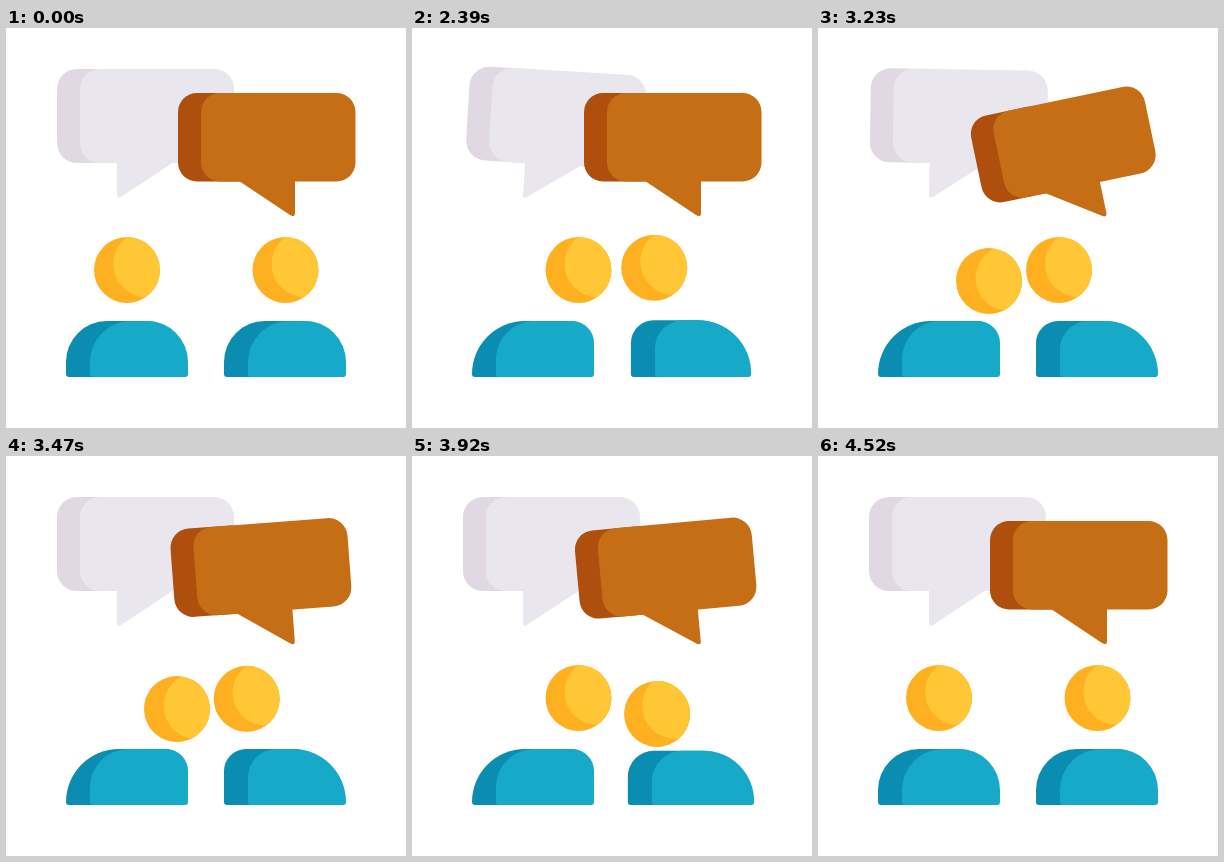
Write an HTML page that moves like this. It is 400 px wide and 400 px high and loops after 4550 ms.

```html
<!DOCTYPE html>
<html lang="en">
<head>
<meta charset="utf-8">
<title>Conversation</title>
<style>
  html, body { margin: 0; width: 100%; height: 100%; overflow: hidden; background: #fff; }
  svg { display: block; width: 100%; height: 100%; }
  .skin { fill: #ffb020; }
  .glow { fill: #ffc636; }
  .shade { fill: #0b8cb1; }
  .shirt { fill: #16a9c8; }
</style>
</head>
<body>
<svg viewBox="0 0 400 400">
  <defs>
    <clipPath id="face"><circle r="33"/></clipPath>
    <g id="head">
      <circle class="skin" r="33"/>
      <g clip-path="url(#face)"><circle class="glow" cx="19" cy="-6" r="33"/></g>
    </g>
  </defs>
  <g id="bubbleL" fill="#eae6ed">
    <rect x="51" y="41" width="80" height="94" rx="20" fill="#e0d9e3"/>
    <rect x="74" y="41" width="154" height="94" rx="20"/>
    <path d="M111 130V167Q111 171 115 169L168 134V130Z"/>
  </g>
  <g id="bubbleR" fill="#c66e16">
    <rect x="172" y="65" width="80" height="88.5" rx="19" fill="#ae4f0e"/>
    <rect x="195" y="65" width="154.5" height="88.5" rx="19"/>
    <path d="M233 150V153L284 187Q289 190 289 185V150Z"/>
  </g>
  <path id="shadeL" class="shade"/><path id="shirtL" class="shirt"/>
  <path id="shadeR" class="shade"/><path id="shirtR" class="shirt"/>
  <use id="headL" href="#head"/>
  <use id="headR" href="#head"/>
</svg>
<script>
const LOOP = 4550, REST = 2030, STEP = 30, MOVE = 380;

// Times in ms against degrees: a swing that dies away
const SWING = [[0, 0], [235, -22], [500, 15.3], [715, -9.3], [970, 3], [1400, 0]];
// Share of a move against pixels: squash, then a slight stretch
const SQUASH = [[0, 0], [.45, 3], [.87, -1], [1, 0]];

const people = [
  { id: 'L', left: 60, right: 182, from: 121, to: 166.5, side: 1,
    lean: 1990, back: 4012, nodIn: 2795, nodOut: 3640, nodX: 4.5, nodY: 11,
    outer: [53, 22], inner: 38, tip: [113, 168], talk: 1990 },
  { id: 'R', left: 218, right: 340, from: 279.5, to: 241, side: -1,
    lean: 2050, back: 3808, nodIn: 3440, nodOut: Infinity, nodX: 5, nodY: 13,
    outer: [22, 53], inner: 28, tip: [288, 188], talk: 3107 }
];

const $ = id => document.getElementById(id);
const clamp = v => Math.min(1, Math.max(0, v));
const ease = v => { v = clamp(v); return v * v * (3 - 2 * v); };
const mix = (a, b, k) => a + (b - a) * k;

function track(keys, t) {
  if (t <= keys[0][0]) return keys[0][1];
  for (let i = 1; i < keys.length; i++) {
    const [t0, a] = keys[i - 1], [t1, b] = keys[i];
    if (t < t1) return mix(a, b, ease((t - t0) / (t1 - t0)));
  }
  return keys[keys.length - 1][1];
}

function torso(x0, x1, top, rl, rr) {
  return `M${x0} 346V${top + rl}A${rl} ${rl} 0 0 1 ${x0 + rl} ${top}` +
    `H${x1 - rr}A${rr} ${rr} 0 0 1 ${x1} ${top + rr}V346Q${x1} 349 ${x1 - 3} 349` +
    `H${x0 + 3}Q${x0} 349 ${x0} 346Z`;
}

function pose(p, t) {
  const out = (t - p.lean) / MOVE, home = (t - p.back) / MOVE;
  const lean = ease(out) - ease(home);
  const squash = track(SQUASH, out) + track(SQUASH, home);
  const nod = (ease((t - p.nodIn) / 200) - ease((t - p.nodOut) / 200)) * (1 - ease(home));

  const x0 = p.left - squash, x1 = p.right + squash, top = 293 + squash * .8;
  const rl = mix(41, p.outer[0], lean), rr = mix(41, p.outer[1], lean);
  $('shade' + p.id).setAttribute('d', torso(x0, x1 - 1, top, rl, rr));
  $('shirt' + p.id).setAttribute('d', torso(x0 + 24, x1, top, mix(41, p.inner, lean), rr));

  const hx = mix(p.from, p.to, lean) + p.side * p.nodX * nod;
  const hy = 242 + p.nodY * nod + 2.6 * squash;
  $('head' + p.id).setAttribute('transform',
    `translate(${hx} ${hy}) rotate(${p.side * 9 * nod})`);

  $('bubble' + p.id).setAttribute('transform',
    `rotate(${track(SWING, t - p.talk)} ${p.tip[0]} ${p.tip[1]})`);
}

const start = performance.now();
function draw() {
  const now = (performance.now() - start) % LOOP;
  const t = now < REST ? 0 : REST + Math.floor((now - REST) / STEP) * STEP;
  for (const p of people) pose(p, t);
  requestAnimationFrame(draw);
}
draw();
</script>
</body>
</html>
```
